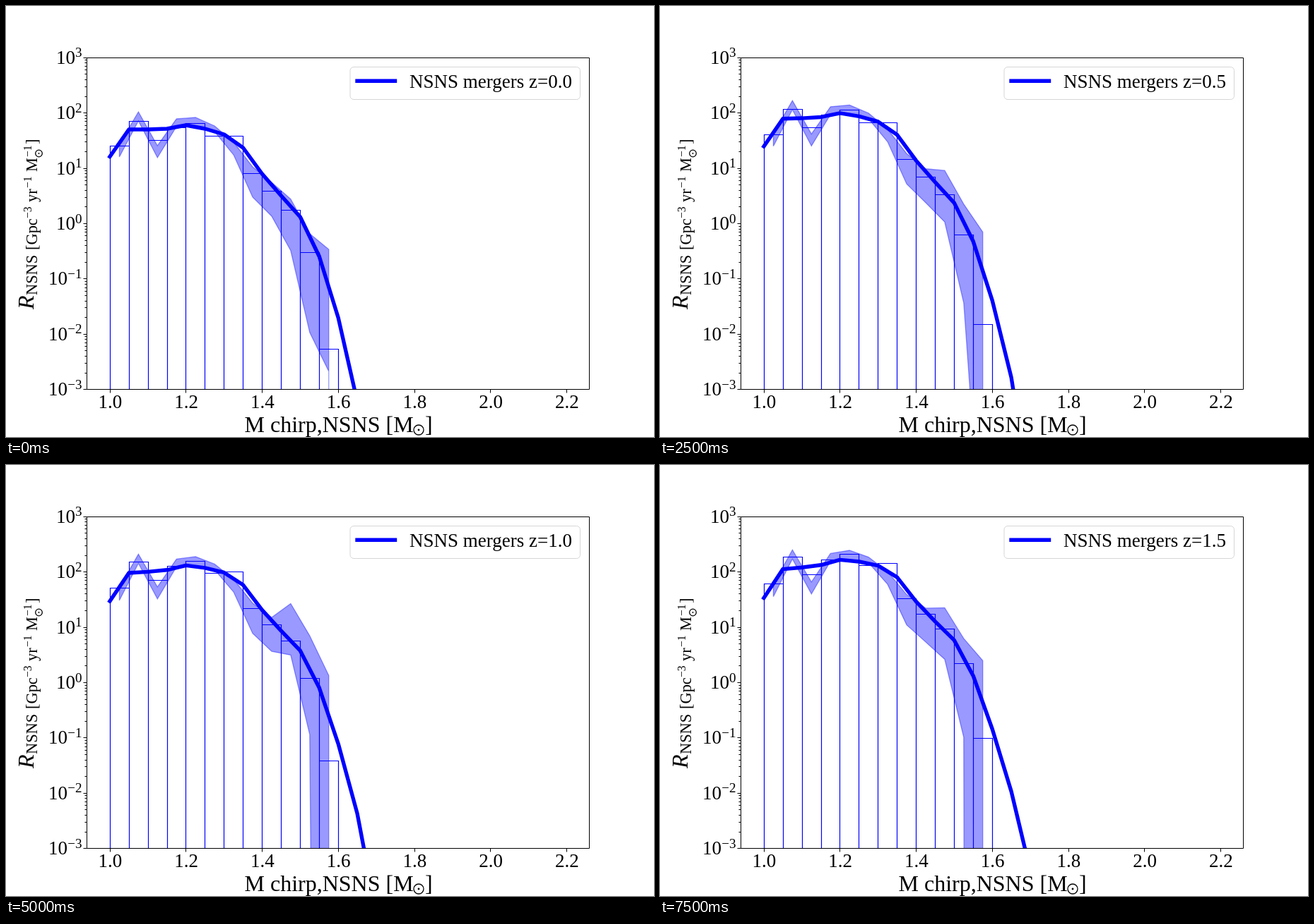
An HTML page for the animation above (8000 ms loop, 917 px wide and 611 px high).

```html
<!DOCTYPE html>
<html lang="en">
<head>
<meta charset="utf-8">
<title>NSNS merger rate by chirp mass</title>
<style>
html, body { margin: 0; width: 100%; height: 100%; overflow: hidden; background: #fff; }
svg { display: block; width: 917px; height: 611px; }
text { font-family: "Liberation Serif", "Times New Roman", serif; font-size: 27px; }
.axis { fill: none; stroke: #000; stroke-width: 1; }
.band { fill: #00f; fill-opacity: .4; stroke: #00f; stroke-opacity: .4; stroke-width: 1.3; }
.bars { fill: none; stroke: #00f; stroke-width: 1.2; }
.rate { fill: none; stroke: #00f; stroke-width: 5.4; stroke-linecap: square; stroke-linejoin: round; }
</style>
</head>
<body>
<svg viewBox="0 0 917 611">
  <clipPath id="plot"><rect x="114.6" y="73.3" width="710.7" height="470.5"/></clipPath>
  <g clip-path="url(#plot)">
    <path id="band" class="band"/>
    <path id="bars" class="bars"/>
    <path id="rate" class="rate"/>
  </g>
  <path id="axes" class="axis"/>
  <g id="ticks"></g>
  <rect x="487" y="86.5" width="325.5" height="46" rx="5" fill="#fff" stroke="#ccc" stroke-opacity=".8"/>
  <path class="rate" d="M497 106.3H550.5"/>
  <text id="legend" x="571" y="116"></text>
  <g id="labels"></g>
</svg>
<script>
const STEP = 500, STEPS = 16;
const BOTTOM = 543.8, DECADE = 78.42, LEFT = 146.97, BIN = 26.937;
const $ = id => document.getElementById(id);
const poly = pts => pts.map(p => p[0].toFixed(2) + ' ' + p[1].toFixed(2)).join('L');

// Heights of each curve at redshift 0; everything later follows from rise().
const rateBase = [213.5, 175, 175, 174, 169, 174, 182, 201, 238, 269, 299, 355, 442, 561, 760];
const barBase = [198, 163, 190, 172, 166, 184, 184, 237, 262, 289, 349, 486];
const upperBase = [196, 150, 198, 160, 158, 170, 193, 228, 250, 253, 302, 345];
const lowerBase = [214, 163, 215, 171, 171, 178, 211, 271, 298, 326, 442, 518];

// Pixels gained since redshift 0: heavy bins gain more, light bins gain earlier.
function rise(i, z) {
  const gain = 25 + 2.4 * i + 3 ** (i - 9.6);
  return gain * (z / 1.5) ** (.5 + .035 * i);
}

// The band swings with a period of four steps in the sparse bins.
function wobble(i, step) {
  return i > 8 ? 24 * Math.sin(Math.PI * (i - 8) / 3) * Math.cos(Math.PI * step / 2) : 0;
}

function draw(step) {
  const z = step / 10;
  const edgeOf = base => base.map((y, i) =>
    [LEFT + (i + .5) * BIN, y - rise(i + 1, z) + wobble(i, step)]);
  const top = edgeOf(upperBase), low = edgeOf(lowerBase);
  const last = low[low.length - 1];
  last[1] = 518 + step ** 3.5;
  $('band').setAttribute('d', 'M' + poly([...top, [last[0], 700], ...low.reverse()]) + 'Z');

  const edge = i => Math.floor(LEFT + i * BIN + .25) + .5;
  $('bars').setAttribute('d', barBase.map((y, i) =>
    `M${edge(i)} 560V${Math.floor(y - rise(i + 2, z)) + .5}H${edge(i + 1)}V560`).join(''));

  $('rate').setAttribute('d', 'M' + poly(rateBase.map((y, i) => [LEFT + i * BIN, y - rise(i, z)])));
  $('legend').textContent = 'NSNS mergers z=' + z.toFixed(1);
}

function text(x, y, str, size = 27, extra = '') {
  return `<text x="${x}" y="${y}" style="font-size:${size}px" ${extra}>${str}</text>`;
}

function sun(x, y, r) {
  return `<circle cx="${x}" cy="${y}" r="${r}" fill="none" stroke="#000" stroke-width="1.3"/>` +
    `<circle cx="${x}" cy="${y}" r="${r / 5}"/>`;
}

function buildAxes() {
  let path = 'M114.5 73.5H825.5V543.5H114.5Z', ticks = '';
  const snap = v => Math.floor(v) + .5;
  for (let i = 0; i < 7; i++) {
    const x = LEFT + i * 4 * BIN;
    path += `M${snap(x + .25)} 543.5v5`;
    ticks += text(x + .5, 570, (1 + i / 5).toFixed(1), 27, 'text-anchor="middle"');

    const y = BOTTOM - i * DECADE, power = i - 3;
    path += `M114.5 ${snap(y)}h-5`;
    const sign = power < 0 ? '−' : '';
    ticks += text(sign ? 87 : 98, y + 8.5, '10', 27, 'text-anchor="end"') +
      text(107.5, y - 1, sign + Math.abs(power), 19, 'text-anchor="end"');
    for (let m = 2; m < 10 && i < 6; m++)
      path += `M114.5 ${snap(y - Math.log10(m) * DECADE)}h-3`;
  }
  $('axes').setAttribute('d', path);
  $('ticks').innerHTML = ticks;
}

function buildLabels() {
  const turned = (x, y, str, size, style = 'normal') =>
    text(0, 0, str, size, `transform="translate(${x} ${y}) rotate(-90)" font-style="${style}"`);
  const sub = (y, str) => turned(44, y, str, 22.4);
  const sup = (y, str) => turned(36, y, str, 15.7);
  $('labels').innerHTML =
    text(337.5, 603.5, 'M chirp,NSNS [M', 32) + sun(584, 601, 7) + text(593, 603.5, ']', 32) +
    turned(39, 430, 'R', 32, 'italic') + sub(410, 'NSNS') +
    sub(346, '[Gpc') + sup(301, '−3') + sub(278, 'yr') + sup(258, '−1') +
    sub(235, 'M') + sup(214, '−1') + sun(46.5, 209, 4.8) + sub(196, ']');
}

buildAxes();
buildLabels();
let shown = -1;
const start = performance.now();
function tick(now) {
  const step = Math.floor(Math.max(0, now - start) / STEP) % STEPS;
  if (step !== shown) draw(shown = step);
  requestAnimationFrame(tick);
}
tick(start);
</script>
</body>
</html>
```
